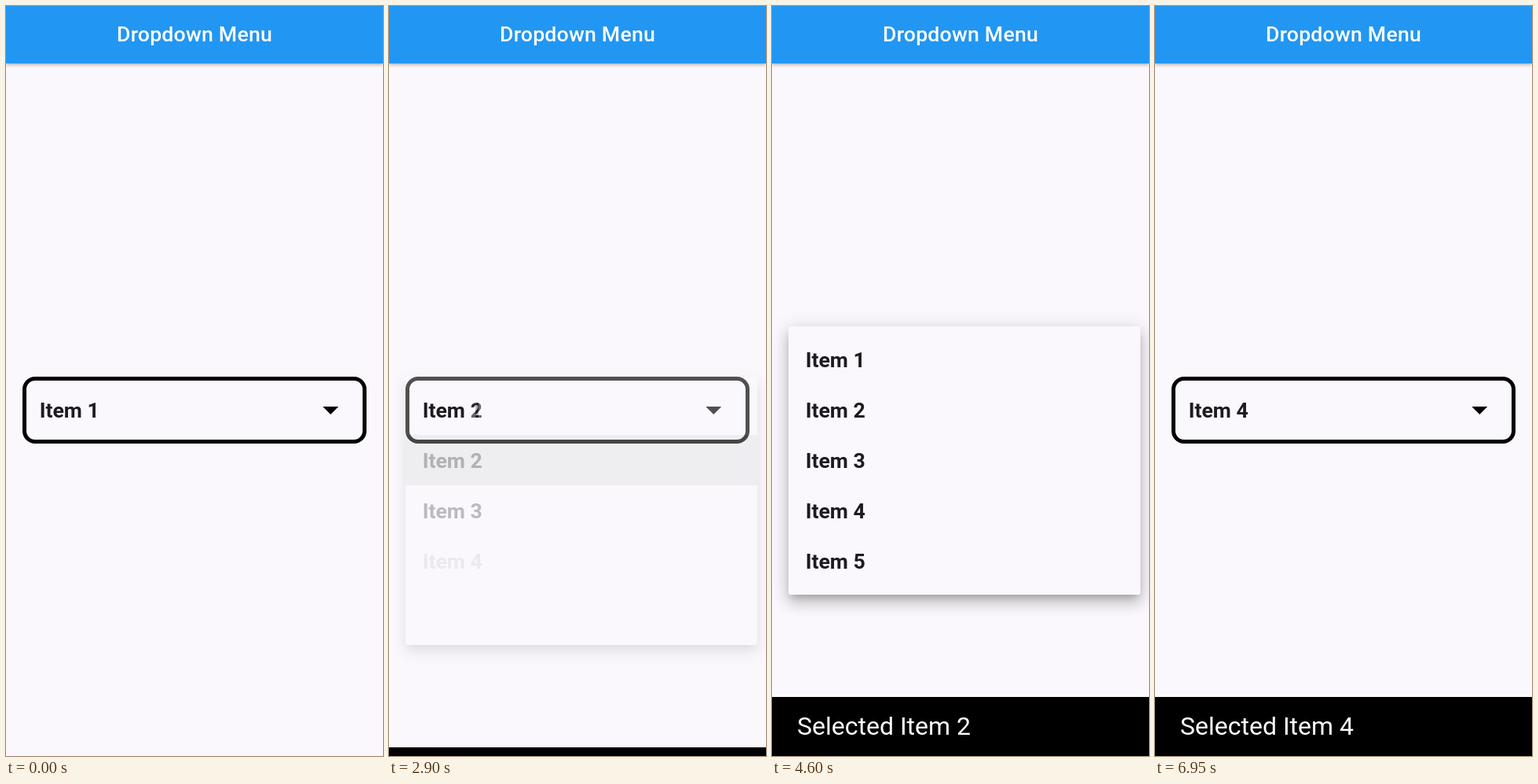
Animation, 480 px wide and 953 px high, one loop 8 s. Source, as an HTML page:

```html
<!DOCTYPE html>
<html lang="en">
<head>
<meta charset="utf-8">
<title>Dropdown Menu</title>
<style>
  html, body { margin: 0; width: 100%; height: 100%; overflow: hidden; }
  body { position: relative; background: #faf8fc; font-family: Roboto, sans-serif; white-space: pre; }
  div { position: absolute; box-sizing: border-box; }
  #appbar {
    left: 0; top: 0; width: 480px; height: 73px; background: #2196f3; color: #fff;
    font: 500 26.67px/73px Roboto, sans-serif; letter-spacing: .2px; text-align: center;
    box-shadow: 0 2px 4px rgba(0, 0, 0, .28);
  }
  #button {
    left: 21.33px; top: 470.67px; width: 437.33px; height: 85.33px;
    border: 5.33px solid #000; border-radius: 16px;
  }
  #arrow {
    left: 403.3px; top: 509px; width: 20px; height: 10px;
    background: #000; clip-path: polygon(0 0, 100% 0, 50% 100%);
  }
  .label { left: 42.67px; color: #1d1b20; font: 700 26.67px/64px Roboto, sans-serif; }
  #value { top: 481.7px; }
  #snackbar {
    left: 0; width: 480px; height: 75px; padding-left: 32px; background: #000; color: #fff;
    font: 400 32px/75px Roboto, sans-serif;
  }
  #menu { left: 0; top: 0; width: 480px; height: 953px; }
  #panel {
    left: 21.33px; width: 448px; background: #faf8fc; border-radius: 2.67px;
    box-shadow: 0 6.67px 9px -4px rgba(0, 0, 0, .2),
                0 10.67px 16.7px 1.33px rgba(0, 0, 0, .14),
                0 4px 22.9px 2.67px rgba(0, 0, 0, .12);
  }
  #row { left: 21.33px; width: 448px; height: 64px; overflow: hidden; }
  #highlight { inset: 0; background: rgba(188, 188, 188, .4); }
  #splash { border-radius: 50%; background: rgba(200, 200, 200, .4); }
</style>
</head>
<body>
<div id="button"></div>
<div id="arrow"></div>
<div id="value" class="label"></div>
<div id="snackbar"></div>
<div id="menu">
  <div id="panel"></div>
  <div id="row"><div id="highlight"></div><div id="splash"></div></div>
</div>
<div id="appbar">Dropdown Menu</div>
<script>
const LOOP = 8000, ITEMS = 5, ROW = 64, PAD = 10.67, CENTER = 513.33;
const MENU_HEIGHT = ITEMS * ROW + 2 * PAD;

// Each visit: menu opens, one row is pressed, released and the menu closes.
const visits = [
  { selected: 0, picked: 1, open: 913, shown: 913, openTime: 300,
    press: 1960, pressTime: 290, x: 186, radius: 58, release: 2840, close: 2850 },
  { selected: 1, picked: 3, open: 4150, shown: 4250, openTime: 360,
    press: 5360, pressTime: 340, x: 162, radius: 72.5, release: 6550, close: 6583 }
];

const $ = id => document.getElementById(id);
const clamp = v => Math.min(1, Math.max(0, v));
const interval = (v, from, to) => clamp((v - from) / (to - from));
const mix = (a, b, k) => a + (b - a) * k;

// cubic-bezier(.4, 0, .2, 1)
function fastOutSlowIn(x) {
  let lo = 0, hi = 1;
  for (let i = 0; i < 24; i++) {
    const s = (lo + hi) / 2, r = 1 - s;
    if (1.2 * r * r * s + .6 * r * s * s + s * s * s < x) lo = s; else hi = s;
  }
  return 3 * (1 - lo) * lo * lo + lo ** 3;
}

const labels = Array.from({ length: ITEMS }, (_, i) => {
  const label = document.createElement('div');
  label.className = 'label';
  label.textContent = 'Item ' + (i + 1);
  $('menu').append(label);
  return label;
});

function drawMenu(t) {
  const visit = visits.find(v => t >= v.shown && t < v.close + 300);
  $('menu').style.display = visit ? '' : 'none';
  if (!visit) return;

  const closing = t >= visit.close;
  const v = closing ? 1 - (t - visit.close) / 300 : clamp((t - visit.open) / visit.openTime);
  $('menu').style.opacity = closing ? interval(v, .75, 1) : interval(v, 0, .25);

  const start = CENTER - ROW / 2, end = start - PAD - visit.selected * ROW;
  const grow = closing ? 1 : interval(v, .25, .5);
  const top = mix(start, end, grow), bottom = mix(start + ROW, end + MENU_HEIGHT, grow);
  $('panel').style.top = top + 'px';
  $('panel').style.height = bottom - top + 'px';

  const unit = .5 / (ITEMS + 1.5);
  labels.forEach((label, i) => {
    const from = .5 + (i + 1) * unit;
    label.style.top = end + PAD + i * ROW + .4 + 'px';
    label.style.opacity = i === visit.selected ? 1 : interval(v, from, from + 1.5 * unit);
  });

  const radius = t >= visit.release ? 600 : visit.radius * clamp((t - visit.press) / visit.pressTime);
  $('row').style.top = end + PAD + visit.picked * ROW + 'px';
  $('highlight').style.opacity = clamp((t - visit.press) / 200);
  Object.assign($('splash').style, {
    left: visit.x - 21.33 - radius + 'px', top: 35 - radius + 'px',
    width: 2 * radius + 'px', height: 2 * radius + 'px'
  });
}

function draw(t) {
  const last = visits.filter(v => t >= v.close).pop();
  const value = 'Item ' + (last ? last.picked + 1 : 1);
  $('value').textContent = value;
  $('snackbar').textContent = 'Selected ' + value;
  $('snackbar').style.top = 953 - (last ? 75 * fastOutSlowIn(clamp((t - last.close) / 250)) : 0) + 'px';
  drawMenu(t);
}

const began = performance.now();
function tick() {
  draw((performance.now() - began) % LOOP);
  requestAnimationFrame(tick);
}
tick();
</script>
</body>
</html>
```
